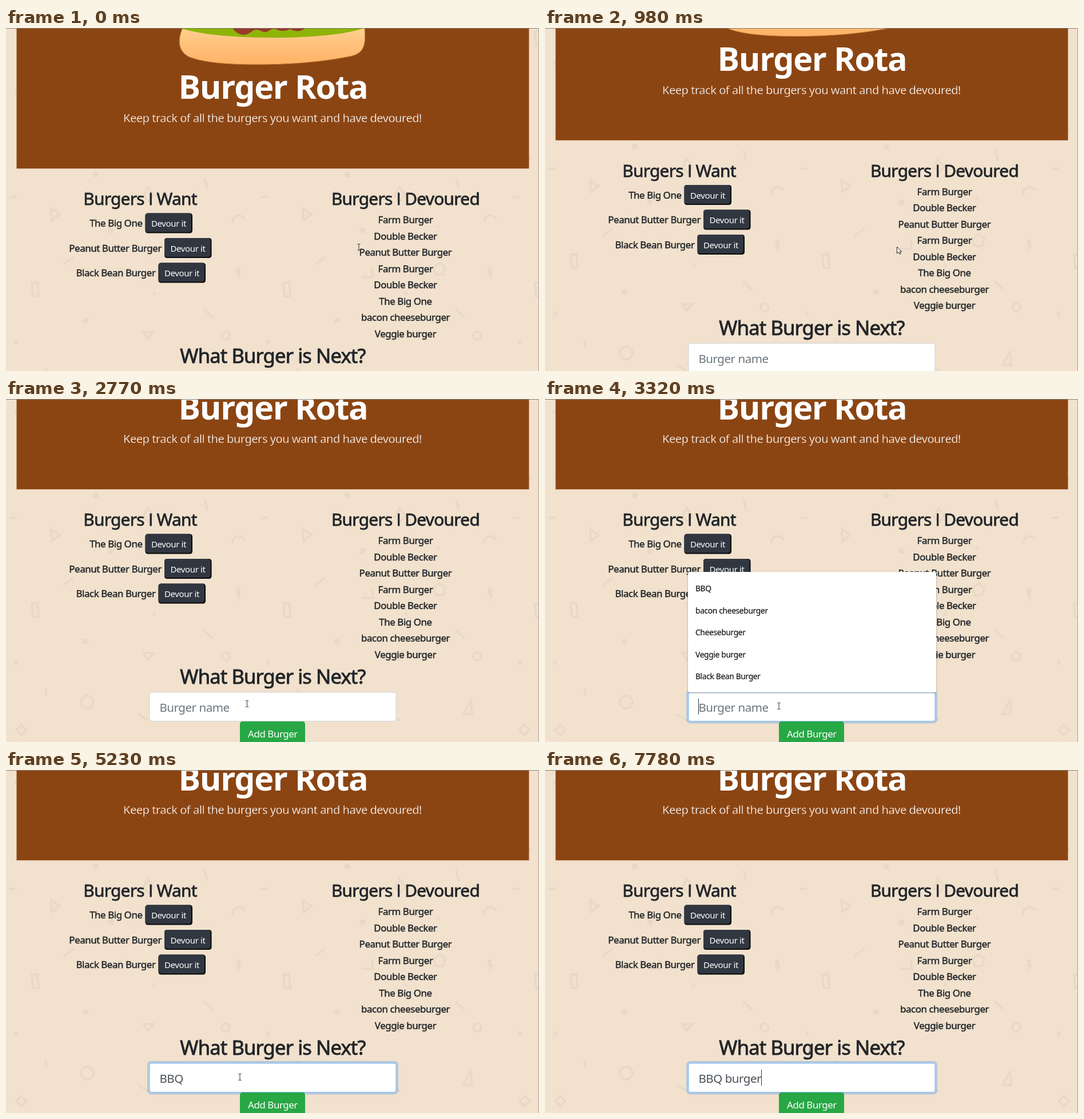
These frames come from a looping animation (932 by 601 pixels, 8 s). An HTML page:

```html
<!DOCTYPE html>
<html lang="en">
<head>
<meta charset="utf-8">
<title>Burger tracker</title>
<style>
  html, body { margin: 0; width: 100%; height: 100%; overflow: hidden; background: #f1e1cd; }
  svg { display: block; width: 100%; height: 100%; }
  text { font-family: "Noto Sans", "Open Sans", sans-serif; letter-spacing: -.025em; fill: #212529; white-space: pre; }
  .mid { text-anchor: middle; }
  .end { text-anchor: end; }
  .plain { font-family: "Open Sans", sans-serif; }
  /* A thin outline in the text colour gives a medium weight. */
  .burger, .heading, .next { stroke: #212529; stroke-width: .026em; }
  .burger { font-size: 16.9px; }
  .heading { font-size: 29.9px; }
  .next { font-size: 34.6px; }
  .title { font-size: 57.5px; font-weight: 700; fill: #fff; }
  /* An outline in the background colour thins the letters. */
  .lead { font-size: 20.1px; fill: #fff; stroke: #8b4513; stroke-width: .35px; }
  .button { font-size: 15px; fill: #fff; }
  .add { font-size: 16.9px; fill: #fff; }
  .field { font-size: 20.6px; fill: #495057; }
  .hint { fill: #6c757d; }
  .option { font-size: 13.8px; fill: #111; stroke: #111; stroke-width: .15px; }
</style>
</head>
<body>
<svg viewBox="0 0 932 601">
  <defs>
    <pattern id="confetti" y="240" width="440" height="440" patternUnits="userSpaceOnUse">
      <g transform="translate(0 -240)" fill="none" stroke="#e8d9c6" stroke-width="3.5">
        <path d="M347 263l5 20M6 297l12-2M79 316l15 10-14 11zM248 279l10 14-9 10-9-9zM396 341a11 11 0 0 1 21-6
          M101 414l17-13M182 436l19 1-1-17M346 493l16 15M240 533h18l-10 12zM70 596v12M231 640l18 11
          M360 640h15l-2-23zM27 659l9 9-9 9-9-9zM318 411l10 7-3 13-13 1-5-12z"/>
        <rect x="46" y="446" width="10" height="24" transform="rotate(-6 51 458)"/>
        <circle cx="384" cy="539" r="7"/>
        <circle cx="142" cy="619" r="11"/>
        <g fill="#e8d9c6" stroke="none">
          <circle cx="157" cy="257" r="5"/>
          <circle cx="18" cy="550" r="3.5"/>
          <path d="M180 349l9 2-2 9-9-2zM312 350l3-5 4 5zM403 420h7l-1 9h3l-7 14 1-11h-4zM256 467l3-7 4 7zM135 508l9 1-1 8-9-1z"/>
        </g>
      </g>
    </pattern>
    <linearGradient id="bun" x2="0" y2="1">
      <stop stop-color="#ffd08f"/>
      <stop offset=".5" stop-color="#ffc07a"/>
      <stop offset="1" stop-color="#ffb265"/>
    </linearGradient>
    <filter id="shadow" x="-5%" y="-10%" width="110%" height="120%">
      <feDropShadow dx="0" dy="1" stdDeviation="1.5" flood-opacity=".35"/>
    </filter>
  </defs>

  <g id="page">
    <rect width="932" height="700" fill="url(#confetti)"/>
    <rect x="18.5" width="896" height="246.3" fill="#8b4513"/>
    <path d="M309 0C299 22 302 41 319 50C345 61 390 64 440 64C505 64 560 58 600 50C624 45 630 34 627 0z" fill="url(#bun)" stroke="#c9803c"/>
    <path d="M303 0C350 14 410 17 480 17C545 16 600 10 627 0z" fill="#8fb408"/>
    <path d="M396 0C402 9 412 14 421 11C429 8 432 3 437 3C446 3 447 8 455 7C461 5 465 0 472 2C482 7 490 5 497 2C505 6 514 8 524 0z" fill="#983a2a"/>
    <g id="content"></g>
  </g>

  <g id="popup" filter="url(#shadow)"></g>
  <path id="caret" d="M.5 525v28" stroke="#333"/>
  <path id="arrow" d="M.5 .5V12l2.7-2.5 2 4 2-1-2-3.8h3.6z" fill="#fff" stroke="#222"/>
  <path id="beam" d="M-2.5 -5.5h2l.5.5 .5-.5h2M0 -5V5M-2.5 5.5h2l.5-.5 .5.5h2" fill="none" stroke="#333"/>
  <path d="M0 .5H932" stroke="#858079"/>
  <path d="M931.5 0V601" stroke="#aba094"/>
</svg>

<script>
const LOOP = 8000;
const $ = id => document.getElementById(id);
const text = (x, y, style, words) => `<text x="${x}" y="${y}" class="${style}">${words}</text>`;
const box = (x, y, w, h, fill, more = '') =>
  `<rect x="${x}" y="${y}" width="${w}" height="${h}" rx="4.5" fill="${fill}" ${more}/>`;
const I = '<tspan class="plain">I</tspan>';

const wanted = [['The Big One', 243.5], ['Peanut Butter Burger', 277], ['Black Bean Burger', 266.5]];
const devoured = ['Farm Burger', 'Double Becker', 'Peanut Butter Burger', 'Farm Burger', 'Double Becker',
  'The Big One', 'bacon cheeseburger', 'Veggie burger'];

$('content').innerHTML =
  text(467, 124, 'title mid', 'Burger Rota') +
  text(466, 165, 'lead mid', 'Keep track of all the burgers you want and have devoured!') +
  text(234.5, 310, 'heading mid', `Burgers ${I} Want`) +
  text(698.5, 310, 'heading mid', `Burgers ${I} Devoured`) +
  wanted.map(([name, x], i) => {
    const y = 324.5 + i * 43.5;
    return text(x - 5, y + 23.5, 'burger end', name) + box(x, y, 82.5, 35, '#08090b') +
      box(x, y, 80.5, 33, '#313741') + text(x + 41, y + 23.5, 'button mid', 'Devour it');
  }).join('') +
  devoured.map((name, i) => text(698.5, 342 + i * 28.5, 'burger mid', name)).join('') +
  text(466.5, 587, 'next mid', 'What Burger is Next?') +
  box(249, 600, 435, 54.5, 'none', 'id="glow" stroke="#007bff" stroke-opacity=".25" stroke-width="4"') +
  box(251, 602, 431, 50.5, '#fff', 'id="input" stroke="#ced4da"') +
  text(268.5, 636, 'field hint', '').replace('<text', '<text id="field"') +
  box(409, 653, 114, 46, '#28a745') +
  text(466.5, 681, 'add mid', 'Add Burger');

// Each track lists [start time, value]; a value holds until the next one.
const tracks = {
  scroll: [[0, 0], [860, 14], [980, 49.5], [1110, 82], [1260, 88]],
  glow: [[0, 0], [3190, .6], [3320, 1]],
  typed: [[0, 0], [4060, 1], [4360, 2], [4680, 3], [5540, 4], [5690, 5], [5980, 6], [6130, 7],
    [6430, 8], [6580, 9], [6730, 10]],
  caret: [[0, 0], [3190, 1], [3780, 0], [4060, 1], [5230, 0], [5540, 1], [7170, 0], [7780, 1]],
  options: [[0, []],
    [3320, ['BBQ', 'bacon cheeseburger', 'Cheeseburger', 'Veggie burger', 'Black Bean Burger']],
    [4060, ['BBQ', 'bacon cheeseburger', 'Black Bean Burger']], [4360, ['BBQ']], [4680, []]],
  pointer: [[0, ['beam', 617, 384]], [440, ['arrow', 615, 383]], [2500, ['arrow', 560, 432]],
    [2620, ['beam', 483.5, 500]], [2770, ['beam', 421.5, 534]], [2920, ['beam', 413, 537]],
    [3050, ['beam', 409, 538]], [7630, ['beam', 426, 542]], [7780, ['beam', 463, 489]]]
};
const valueAt = (track, t) => track.findLast(([start]) => start <= t)[1];

function popup(options) {
  if (!options.length) return '';
  const height = 18.5 + options.length * 38.5;
  const top = options.length > 1 ? 514 - height : 566;
  return `<rect x="250" y="${top}" width="434" height="${height}" rx="3" fill="#fff"/>` +
    options.map((name, i) => text(263, top + 34 + i * 38.5, 'option', name)).join('');
}

let shownOptions;
function draw(now) {
  const t = now % LOOP;
  const state = {};
  for (const key in tracks) state[key] = valueAt(tracks[key], t);

  $('page').setAttribute('transform', `translate(0 ${-state.scroll})`);
  $('glow').setAttribute('opacity', state.glow);
  $('input').setAttribute('stroke', state.glow ? '#80bdff' : '#ced4da');

  const field = $('field');
  field.textContent = 'BBQ burger'.slice(0, state.typed) || 'Burger name';
  field.classList.toggle('hint', !state.typed);
  const caretX = 268 + (state.typed ? Math.round(field.getComputedTextLength()) : 0);
  $('caret').setAttribute('transform', `translate(${caretX} 0)`);
  $('caret').setAttribute('opacity', state.caret);

  if (state.options !== shownOptions) {
    shownOptions = state.options;
    $('popup').innerHTML = popup(shownOptions);
  }

  const [shape, x, y] = state.pointer;
  for (const id of ['arrow', 'beam']) {
    $(id).setAttribute('opacity', id === shape ? 1 : 0);
    $(id).setAttribute('transform', `translate(${x} ${y})`);
  }
}

const started = performance.now();
function tick() {
  draw(performance.now() - started);
  requestAnimationFrame(tick);
}
tick();
</script>
</body>
</html>
```
